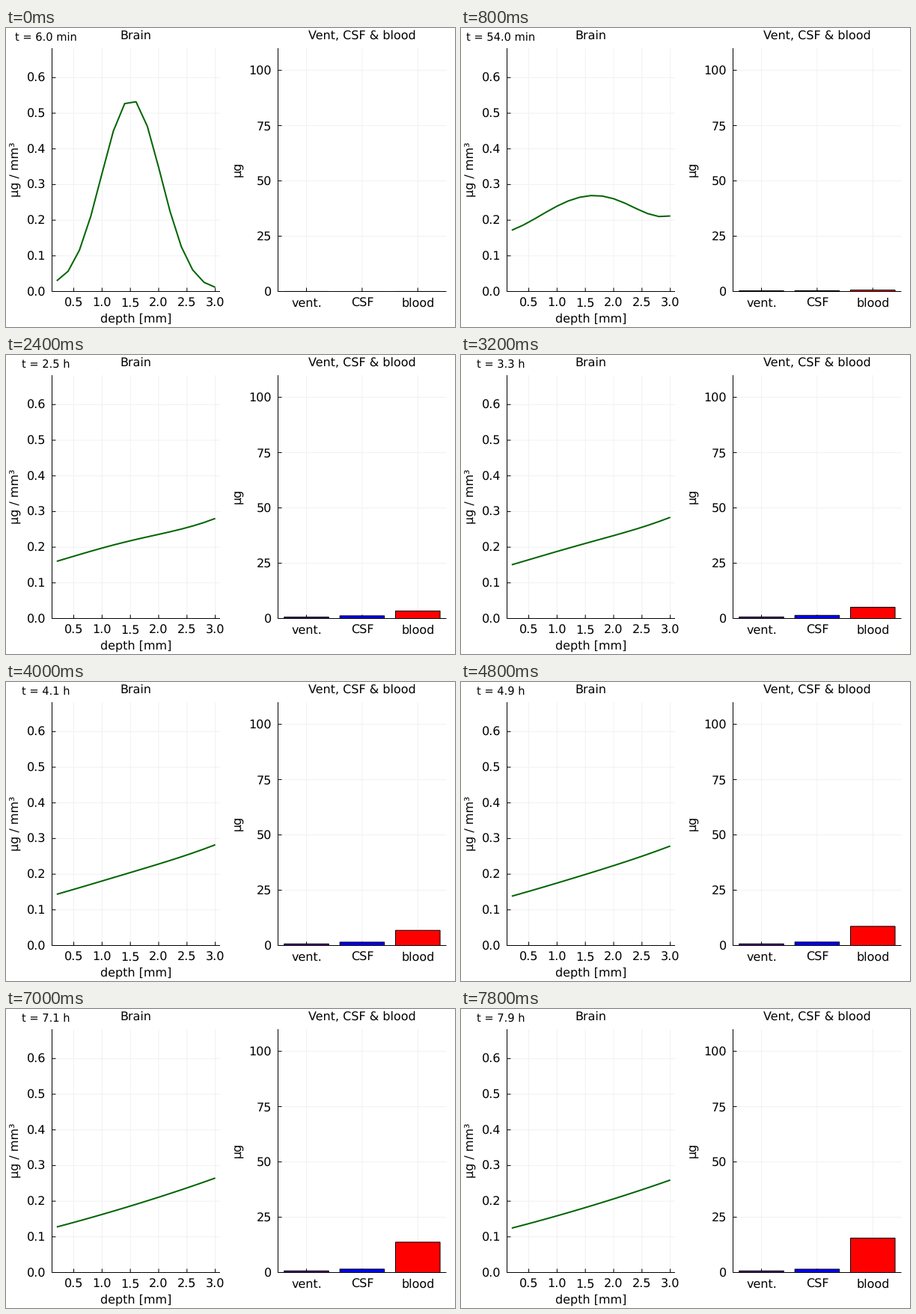
A matplotlib script for the animation above (8000 ms loop, 600 px wide and 400 px high).

```python
import numpy as np
import matplotlib.pyplot as plt
from matplotlib.animation import FuncAnimation
from matplotlib.patches import Rectangle

W, H, DPI = 600, 400, 100
PT = 72 / DPI          # points per pixel
FRAMES, INTERVAL = 40, 200
TOP, BASE = 27, 352.5  # vertical extent of both panels

plt.rcParams["font.family"] = "DejaVu Sans"
plt.rcParams["text.hinting"] = "none"

fig = plt.figure(figsize=(W / DPI, H / DPI), dpi=DPI, facecolor="white")
ax = fig.add_axes([0, 0, 1, 1])
ax.set_xlim(0, W)
ax.set_ylim(H, 0)
ax.axis("off")


def depth_x(d):
    return 61.5 + (d - 0.116) * 75.64


def conc_y(c):
    return BASE - c * 477


def mass_y(m):
    return BASE - m * 2.959


def segment(x, y, color="black", z=2):
    ax.plot(x, y, color=color, lw=PT, zorder=z, solid_capstyle="butt",
            snap=False)


def label(x, y, s, ha="center", size=16, rotation=0):
    return ax.text(x, y, s, ha=ha, va="baseline", fontsize=size * PT,
                   rotation=rotation, rotation_mode="anchor", zorder=6)


def panel(left, right, xticks, yticks, title):
    for x, name in xticks:
        segment([x, x], [TOP, BASE], "#f1f1f1", 1)
        segment([x, x], [BASE - 5, BASE])
        label(x, 372.8, name)
    for y, name in yticks:
        segment([left, right], [y, y], "#f1f1f1", 1)
        segment([left, left + 5], [y, y])
        label(left - 8.3, y + 5.8, name, ha="right")
    segment([left, left], [TOP, BASE + 0.5])
    segment([left - 0.5, right], [BASE, BASE])
    label((left + right) / 2, 14.8, title)


panel(61.5, 286,
      [(depth_x(d), f"{d:.1f}") for d in np.arange(0.5, 3.1, 0.5)],
      [(conc_y(c), f"{c:.1f}") for c in np.arange(7) / 10],
      "Brain")
label(173.7, 393.8, "depth [mm]")
label(17.5, 188.8, "µg / mm³", rotation=90)

BAR_X = 401.5 + 74.4 * np.arange(3)
HALF = 29.75
panel(363.5, 588.5,
      list(zip(BAR_X, ["vent.", "CSF", "blood"])),
      [(mass_y(m), str(m)) for m in range(0, 101, 25)],
      "Vent, CSF & blood")
label(314, 188.8, "µg", rotation=90)

clock = label(53.3, 17, "", size=14.67)
curve, = ax.plot([], [], color="darkgreen", lw=2 * PT, zorder=4,
                 solid_capstyle="butt")
bars = [ax.add_patch(Rectangle((x - HALF, BASE), 2 * HALF, 0, fc=color,
                               ec="black", lw=PT, zorder=3, snap=False))
        for x, color in zip(BAR_X, ["indigo", "blue", "red"])]

# Diffusion between two walls, written as cosine modes around a steady slope.
CELLS = 15
depth = 0.2 * np.arange(1, CELLS + 1)
modes = np.arange(1, CELLS)
basis = np.cos(np.pi * np.outer(modes, np.arange(CELLS) + 0.5) / CELLS)
rates = 0.0103 * modes ** 2
rates[0] = 0.0112
T0 = 6

offset = depth - 1.6
steady = 0.9895 + 0.2566 * offset + 0.014 * offset ** 2
start = sum(np.exp(-(depth - c) ** 2 / 0.54)
            for c in (1.513, 0.2 - 1.513, 6.2 - 1.513))
weights = 2 / CELLS * basis @ (start / start.mean() - steady)
COUPLING = [(0, 1, 0.034), (1, 0, -0.07), (2, 1, 0.14), (3, 1, -0.045)]


def profile(t):
    decay = np.exp(-rates * (t - T0))
    amp = weights * decay
    for n, m, k in COUPLING:
        amp[n] += k * (decay[m] - decay[n])
    mean = 0.2255 * np.exp(-0.000478 * (t - 102))
    mean -= 0.0018 * np.exp(-(t - T0) / 20)
    return mean * (steady + amp @ basis)


def masses(t):
    fill = 1 - np.exp(-t / 80)
    vent = 0.85 * np.exp(-0.0003 * t) * fill ** 1.4
    csf = 1.92 * np.exp(-0.0005 * t) * fill ** 2.3
    blood = 0.0386 * (t - 71 * (1 - np.exp(-t / 74)))
    return vent, csf, blood


def update(i):
    t = T0 + 12 * i
    clock.set_text(f"t = {t:.1f} min" if t < 120 else f"t = {t / 60:.1f} h")
    curve.set_data(depth_x(depth), conc_y(profile(t)))
    for bar, m in zip(bars, masses(t)):
        bar.set_height(mass_y(m) - BASE)
    return [clock, curve, *bars]


anim = FuncAnimation(fig, update, frames=FRAMES, interval=INTERVAL,
                     repeat=True, blit=False)
plt.show()
```
